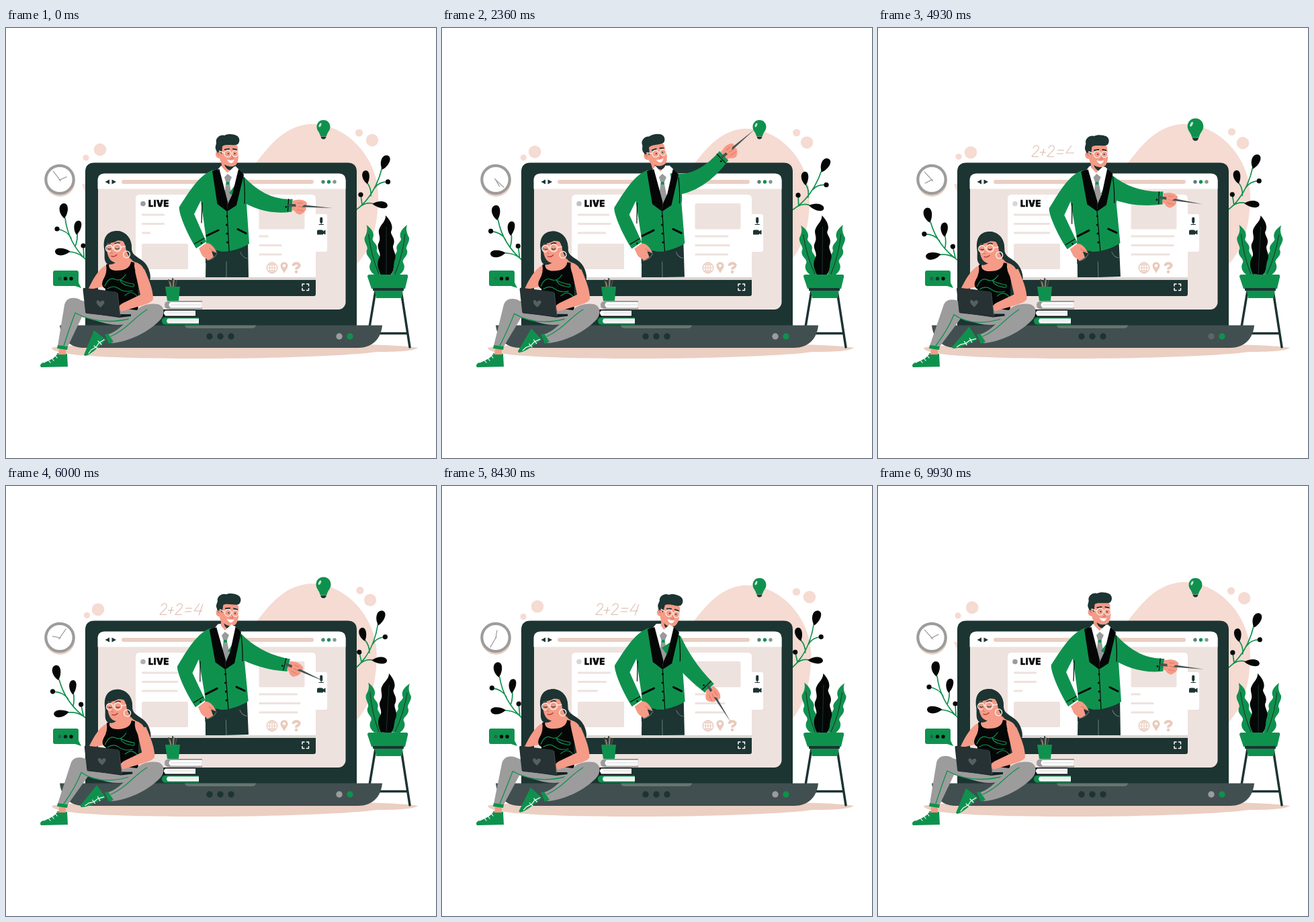
Write an HTML page that moves like this. It is 640 by 640 pixels and loops after 10000 ms.

```html
<!DOCTYPE html>
<html lang="en">
<head>
<meta charset="utf-8">
<title>Online lesson</title>
<style>
html, body { margin: 0; width: 100%; height: 100%; overflow: hidden; background: #fff; }
svg { display: block; width: 100vw; height: 100vh; }
.d { fill: #1c3432; } .g { fill: #0f914e; } .s { fill: #f59b87; } .b { fill: #ebcfc2; }
.p { fill: #f5dbd2; } .c { fill: #eee2de; } .w { fill: #fff; } .y { fill: #9c9c9c; } .k { fill: #050707; }
.l { fill: none; stroke-linecap: round; stroke-linejoin: round; }
.lg { stroke: #0f914e; } .lk { stroke: #050707; } .ld { stroke: #1c3432; } .lw { stroke: #fff; }
.ls { stroke: #d97766; } .lb { stroke: #e9cabb; }
text { font: 900 12.6px Inter, "Open Sans", sans-serif; letter-spacing: .6px; stroke: #050707; stroke-width: .5px; }
</style>
</head>
<body>
<svg viewBox="0 0 640 640">
<defs>
  <path id="leaf" d="M0 11.500C-9 3-8-11 1-11C9-10 7 4 0 11.500Z"/>
  <path id="frond" d="M537 293C545 299 550 306 546 314C546 319 555 322 552 331C552 336 560 340 557 349Q556 358 560 367H548C540 361 540 354 543 349C545 343 535 340 537 331C541 326 533 320 534 312C538 305 539 299 537 293Z"/>
  <path id="vein" class="l ld" d="M540 307Q544 340 555 366"/>
</defs>

<path id="blob" class="p" d="M113 232L250 250L372 201C394 172 416 146 452 143C508 141 554 195 554 250C554 300 541 333 518 356L300 400L140 300Z"/>
<g class="p">
  <g id="big"><circle cx="140" cy="181" r="9.300"/><circle cx="545" cy="167" r="9.200"/></g>
  <g id="small"><circle cx="119" cy="193" r="4.600"/><circle cx="525.500" cy="156" r="5.600"/></g>
</g>
<path class="b" d="M68 476C110 466 560 466 613 476C606 482 570 482 552 482C480 492 220 496 110 487C80 484 68 480 68 476Z"/>

<circle class="b" cx="80.500" cy="229" r="22"/>
<circle cx="80" cy="225.500" r="20.700" fill="#fff" stroke="#9c9c9c" stroke-width="4.200"/>
<g class="l" stroke="#a0a0a0" stroke-width="1.300">
  <path id="minute" d="M80 228V210"/><path id="hour" d="M80 227V215"/>
</g>

<g id="sprigL">
  <path class="l lg" stroke-width="1.700" d="M121 347C103 330 91 308 88 283M76 299Q92 302 97 313M106 304Q107 315 103 325M115 324L116 341M92 333Q106 333 115 341"/>
  <g class="k">
    <use href="#leaf" transform="translate(86 272) rotate(-4)"/>
    <use href="#leaf" transform="translate(106.500 297) rotate(8) scale(.85 .95)"/>
    <use href="#leaf" transform="translate(84 333) rotate(-92) scale(.85 1)"/>
    <circle cx="76" cy="299" r="3.600"/><circle cx="115" cy="324" r="3.600"/>
  </g>
</g>
<g id="sprigR">
  <path class="l lg" stroke-width="1.700" d="M518 273C540 258 553 236 560 207M538 231Q544 239 543 250M568 229Q555 229 549 238M528 248L530 263M548 262Q538 258 528 265"/>
  <g class="k">
    <use href="#leaf" transform="translate(564 200) rotate(20)"/>
    <use href="#leaf" transform="translate(536 222) rotate(-10) scale(.85 .9)"/>
    <use href="#leaf" transform="translate(557 263) rotate(96) scale(.8 1)"/>
    <circle cx="568.500" cy="229" r="3.600"/><circle cx="528" cy="248" r="3.600"/>
  </g>
</g>

<g id="bulb">
  <path class="g" d="M472.500 137C479 137 482.500 142 482.500 147C482.500 153 478 155 477 161H468C467 155 462.500 153 462.500 147C462.500 142 466 137 472.500 137Z"/>
  <path class="d" d="M468.500 161.500H476.500Q476 165.500 472.500 165.500Q469 165.500 468.500 161.500Z"/>
  <ellipse cx="467.500" cy="144.500" rx="1.500" ry="3.200" fill="#c9ecd3" transform="rotate(25 467.500 144.500)"/>
</g>
<path id="rays" class="l" stroke="#dd9a5c" stroke-width="2" d="M461 129L462 130.500M473 125.500V127.500M484 128.500L483 130"/>
<g id="sum" class="l" stroke="#dcbbad" stroke-width="1.100" style="stroke-linecap:butt"></g>

<g class="l ld" stroke-width="3.500">
  <path d="M550 391L541 445M588 391L601 475M555 454.500H597"/>
</g>
<g id="frondL"><use href="#frond" class="g"/><use href="#vein"/></g>
<g id="frondR"><g transform="matrix(-1 0 0 1 1134 0)"><use href="#frond" class="g"/><use href="#vein"/></g></g>
<g id="frondM">
  <path class="k" d="M565 279C573 287 577 296 573 303C572 308 580 313 577 322C573 328 582 335 579 344C576 350 579 360 573 367H558C552 356 552 348 556 341C559 334 550 327 555 319C559 311 552 305 556 298C559 291 565 288 565 279Z"/>
  <path class="l ld" d="M566 296V366"/>
</g>
<path class="g" d="M538 370Q538 367 541 367H596Q599 367 598 371L594 388H544ZM548 388H591L589 402H551Z"/>
<path class="d" d="M546 387H592V391H546Z"/>

<path class="d" d="M118 214Q118 200.500 132 200.500H508Q522 200.500 522 214V444H118Z"/>
<rect class="c" x="137" y="217" width="368.500" height="202" rx="11"/>
<path class="w" d="M136.500 239.500V227Q136.500 216.500 147 216.500H495Q505.500 216.500 505.500 227V239.500Z"/>
<path class="d" d="M154 225.500V232.500L147.500 229ZM157.500 225.500V232.500L164 229Z"/>
<rect class="b" x="172" y="226" width="286" height="6" rx="3"/>
<circle cx="472" cy="229" r="2.700" fill="#568078"/><circle class="g" cx="480.500" cy="229" r="2.700"/><circle cx="489" cy="229" r="2.700" fill="#82978f"/>
<path class="w" d="M193 376V254Q193 248 199 248H455Q461 248 461 254V376ZM461 277H475Q478 277 478 280V330Q478 333 475 333H461Z"/>
<circle id="live" cx="204" cy="261.500" r="3.800" fill="#9b9a9e"/>
<text class="k" x="212" y="266">LIVE</text>
<rect class="c" x="202" y="321" width="69" height="38" rx="2"/>
<rect class="c" x="376.500" y="261" width="68" height="38.500" rx="2"/>
<g id="lines" class="c"></g>
<g class="l lb" stroke-width="1.200">
  <circle cx="396" cy="357" r="7.800"/><ellipse cx="396" cy="357" rx="3.700" ry="7.800"/>
  <path d="M396 349V365M388 357H404M390 352.500H402M390 361.500H402"/>
</g>
<path fill="#e9cabb" fill-rule="evenodd" d="M414 365C411 359 408.500 357 408.500 354C408.500 346.500 419.500 346.500 419.500 354C419.500 357 417 359 414 365ZM414 351.500A2.300 2.300 0 1 0 414 356.100A2.300 2.300 0 1 0 414 351.500Z"/>
<path class="l lb" stroke-width="4" d="M427.500 354C427.500 349 437 349 436.500 354C436 357 432 356 432 359.500" style="stroke-linecap:butt"/>
<circle cx="432" cy="363" r="2.200" fill="#e9cabb"/>
<rect class="d" x="467.200" y="281.500" width="4" height="9" rx="2"/>
<path class="l ld" d="M469.200 290V292.500M466 292.500H472.500"/>
<path class="d" d="M463 302Q463 300.500 465 300.500H470Q472 300.500 472 302.500L475.500 300.500V307.500L472 306V307.500H463Z"/>

<path class="d" d="M193 375H461V396Q461 399 458 399H193Z"/>
<path class="l lw" stroke-width="1.500" d="M441 384V381H444M447.500 381H450.500V384M450.500 387.500V390.500H447.500M444 390.500H441V387.500"/>

<g id="teacher">
  <path class="d" d="M298 318L360 316L361 371H297Z"/>
  <path class="l" stroke="#6c7d7a" stroke-width="1" d="M328 348V371M349 334Q352 342 359 343"/>
  <path class="w" d="M315 211L321 205L341 205L347 211L345 240L330 270L316 238Z"/>
  <g id="head">
    <path class="s" d="M320 193H341L341 207L330 216L321 207Z"/>
    <path class="s" d="M316 176C317 167 344 167 345 178L346 191C346 201 341 208 334 208C326 208 320 203 318 194C311 194 310 184 316 182Z"/>
    <path class="d" d="M315 187L312 180C311 176 313 174 313 171C311 163 320 158 325 160C330 157 339 158 343 160C349 163 348 170 345 173C340 176 327 172 322 176L321 188Q317 181 315 187Z"/>
    <path class="d" d="M325 203Q333 209 342 204Q340 211 334 212Q327 210 325 203Z"/>
    <path class="l ld" stroke-width="2" d="M326 181L332 180M338 180L343 181"/>
    <path class="l ls" stroke-width="1.300" d="M335 187L338 194L334 194.500M314.500 185L317 189"/>
    <path class="w" d="M329 196Q335 198 340 196Q338 202 334 201Q331 200 329 196Z"/>
    <g fill="none" stroke="#f9e3dc" stroke-width="1.500"><circle cx="330" cy="187" r="5"/><circle cx="341" cy="187" r="4.500"/><path d="M325 186L317 183"/></g>
    <circle class="d" cx="331" cy="187" r="1"/><circle class="d" cx="340.500" cy="187" r="1"/>
  </g>
  <path class="w" d="M315 211L320 205L329 216L340 206L347 211L336 222L330 217L322 223Z"/>
  <path fill="#999a9c" d="M330 217L336 222L332.500 230L337 255L330 266L324 255L327.500 230L325 222Z"/>
  <path class="g" d="M328 229H332.500V233H327.500Z"/>
</g>
<path id="arm" class="g"/>
<path id="cuff" class="l lk" stroke-width="1.200"/>
<circle id="stud" class="k" r="1.300"/>
<g id="hand">
  <path class="s" d="M0-7L8-9Q16-10 21-6Q23-3 20 0L21 4Q20 9 13 13Q7 13 4 8L0 7Z"/>
  <path fill="#455354" d="M-6-1.800L8-2.200L60 0L8 1.800L-6 1.600Z"/>
  <path class="s" d="M5-4Q12-8 17-4Q19-1 15 0L16 5Q13 8 9 6Q5 4 5-4Z"/>
  <path class="l ls" d="M9 1L17 2M8 6L17 7M8-4L15-4"/>
</g>
<g id="jacket">
  <path class="g" d="M309 211C290 217 276 238 258 266C256 270 264 297 283 328L298 318L280 277L290 257L297 307L299 331Q326 334 333 332Q352 328 362 321L358 262C361 245 356 218 347 211L344 250L329 273L314 250Z"/>
  <path class="k" d="M307 213L317.500 210L330 259L329 273L314.500 262ZM346 210L354 218L343 264L329 273L330 262L337 247Z"/>
  <g class="l lk">
    <path stroke-width="1.200" d="M329 273L332 332M292 260L291 290M354 223Q356 245 355 261M281 321L295 313"/>
    <path stroke-width="3" d="M299 309L316 301M345 299.500L357 305.500"/>
  </g>
  <g class="k"><circle cx="329" cy="280" r="1.500"/><circle cx="328.500" cy="293" r="1.500"/><circle cx="329" cy="306" r="1.500"/><circle cx="329.500" cy="319" r="1.500"/><circle cx="291" cy="320" r="1.300"/></g>
  <path class="d" d="M297 336L313 331L319 332V350H297Z"/>
  <path class="s" d="M287 328L298 320C305 320 310 326 314 335L306 332L309 341L301 346C297 342 293 341 291 337Z"/>
  <path class="l ls" d="M303 328L312 334"/>
  <path class="l" stroke="#6c7d7a" d="M299 346Q309 345 314 336"/>
</g>
<path fill="#ddd5d1" d="M193 371H461V375H193Z"/>

<path fill="#414f50" d="M80 442.500H560C558 464 544 476 524 476H115C95 476 82 462 80 442.500Z"/>
<path fill="#64766f" d="M266 442.500H372Q371 447 366 447H272Q267 447 266 442.500Z"/>
<g class="d"><circle cx="303" cy="459" r="4.700"/><circle cx="319" cy="459" r="4.700"/><circle cx="335" cy="459" r="4.700"/></g>
<circle id="lamp" class="y" cx="496" cy="459" r="4.700"/><circle class="g" cx="512" cy="459" r="4.700"/>

<path class="l" stroke="#434d4b" stroke-width="2" d="M242 375L245 388M248 373V388M254 376L251 388"/>
<path class="l" stroke="#b58a6a" stroke-width="1.500" d="M244 378L246 387M250 374L249 387"/>
<path class="g" d="M237 385H259L257 406H240Z"/>
<g id="books">
  <path class="y" d="M292 406H243Q236 407 236 412Q236 418 243 418.500H292V416H244V408H292Z"/><path class="w" d="M291 408H245Q240 412 245 416.500H291Z"/>
  <path class="k" d="M282 419H234V429.500H282Z"/><path class="w" d="M282 420.500H237Q233 424 237 428.500H282Z"/>
  <path class="g" d="M287 431H238Q232 431 232 436Q232 441.500 238 441.500H287Z"/><path class="w" d="M287 432.500H241Q237 436 241 439.500H287Z"/>
  <path class="l" stroke="#d5d5d5" d="M246 412H290M240 424H280M243 436H285"/>
</g>

<path class="g" d="M73 361H105Q108 361 108 364V379L112 387L103 384H73Q70 384 70 381V364Q70 361 73 361Z"/>
<circle id="dot1" cx="80" cy="373" r="2.700" fill="#2f4c5e"/><circle id="dot2" class="k" cx="88.500" cy="373" r="2.700"/><circle class="k" cx="97" cy="373" r="2.700"/>

<g id="girl">
  <path class="d" d="M146 328C144 310 152 302 165 302C179 303 187 314 187 328C187 342 204 341 211 356C216 366 216 376 212 378C204 378 198 372 194 364L152 352C144 347 148 338 146 328Z"/>
  <path class="s" d="M168 338L183 334C184 344 188 347 194 349C200 351 204 355 206 361L196 380L148 384L122 390C130 372 141 354 152 352Q166 353 168 338Z"/>
  <path class="k" d="M153 351Q152 360 162 361Q184 362 186 348L191 349Q190 362 198 371C195 390 198 405 196 427L146 428L148 388Q140 384 145 374Q151 364 149 352Z"/>
  <path class="l lg" stroke-width="1.200" d="M147 384Q153 370 162 374T178 367M170 375Q180 380 190 381Q193 387 183 384Q172 382 170 375M151 388Q160 382 168 388T188 391M177 398Q187 389 195 399M180 412Q188 401 194 406"/>
  <path class="s" d="M150 320C160 316 172 314 181 321L182 338C178 346 170 350 162 349C153 347 149 336 150 320Z"/>
  <path class="d" d="M148 329C144 316 153 302 166 302C180 303 188 315 187 329L185 344L179 332C178 322 175 316 169 313C165 319 156 320 150 321Z"/>
  <path class="l ld" stroke-width="1.600" d="M150 322.500L155 321M162 321Q165.500 318.500 169 320"/>
  <g fill="none" stroke="#fbe6df" stroke-width="1.600"><circle cx="153.500" cy="328" r="5"/><circle cx="165.500" cy="327" r="5.500"/><path d="M171 326L178 325"/></g>
  <path class="l ld" stroke-width="1.200" d="M152 328.500Q154 330 156 328.500M163 328Q165.500 330 168 328"/>
  <path class="l" stroke="#b83f3d" stroke-width="1.500" d="M157 339.500Q161 341.500 165 337.500"/>
  <path class="l ls" d="M158 329L156 335L159 335.500"/>
  <circle cx="179.500" cy="337" r="5" fill="none" stroke="#f8e9e3" stroke-width="1.500"/>
</g>

<path id="leg" class="y"/>
<path id="seam" class="l lg" stroke-width="1.300"/>
<path class="y" d="M194 421C199 413 214 409 226 411C237 414 237 427 229 435C212 453 180 468 157 469L149 457C169 451 177 438 194 421Z"/>
<path class="l lg" stroke-width="1.200" d="M156 459C180 448 189 432 210 419"/>
<g id="shoe">
  <path class="g" d="M131 450L149 464L142 471C134 478 126 486 118 488Q115 487 117 484Z"/>
  <path class="l lw" stroke-width="1.200" d="M146 464L138 469L134 475L127 479L123 484M137 466L142 471M131 473L136 477"/>
</g>
<path class="g" d="M147 456L152 455L160 467L153 470Z"/>
<path class="g" d="M76 484L91 485L92 504L52 505Q49 501 55 498Q70 494 76 484Z"/>
<path class="l lw" stroke-width="1.200" d="M76 485L70 491L62 495L56 498M67 490L71 495M62 493L66 498M72 486L76 491"/>
<path class="s" d="M79 478H89V486H78Z"/>
<path class="g" d="M77 472L92 474L91 479L76 477Z"/>

<g id="laptop">
  <path fill="#151f20" d="M119 424L168 426L186 426V429L169 431Z"/>
  <path class="s" d="M192 362L206 359C212 373 219 389 219 403C218 410 201 413 172 422L167 417Q169 411 177 408L200 397Z"/>
  <path fill="#263233" d="M114.500 389Q114.500 386 118 387L163 392.500Q166 393 166 395L170 430L121 425Q118 425 118 422Z"/>
  <path class="l" stroke="#435051" stroke-width="1" d="M166 395L170 429"/>
  <path fill="#566061" d="M141 416C132 410 134 404 138 405.500L140 408C143 404 148 406 146 410Z"/>
</g>
</svg>

<script>
const $ = id => document.getElementById(id);
const set = (id, name, value) => $(id).setAttribute(name, value);
const move = (id, value) => set(id, "transform", value);
const LOOP = 10, KEYS = [0, 1.21, 3.5, 4.93, 7, 8.43], N = KEYS.length;

// smooth cyclic curve through one value per key time
const track = vals => {
  const at = i => KEYS[(i + N) % N] + LOOP * Math.floor(i / N);
  const v = i => vals[(i + N) % N];
  const slope = i => (v(i + 1) - v(i - 1)) / (at(i + 1) - at(i - 1));
  return t => {
    let i = N - 1;
    while (KEYS[i] > t) i--;
    const d = at(i + 1) - at(i), u = (t - at(i)) / d, u2 = u * u, u3 = u2 * u;
    return (2 * u3 - 3 * u2 + 1) * v(i) + (u3 - 2 * u2 + u) * d * slope(i)
      + (3 * u2 - 2 * u3) * v(i + 1) + (u3 - u2) * d * slope(i + 1);
  };
};
const wave = (t, peak = 0, period = LOOP) => Math.cos((t - peak) * 2 * Math.PI / period);
const ramp = (t, a, b) => {
  const u = Math.min(1, Math.max(0, (t - a) / (b - a)));
  return u * u * (3 - 2 * u);
};

const tracks = list => list.map(track);
const big = tracks([[0, -3, -.5, -2, -3, 2], [0, 3, 3.3, 4.2, 1, -1.7]]);
const small = tracks([[0, 1, 3, 1, 2, 2], [0, 0, -.5, -1.5, .5, 1.5]]);
const head = tracks([[0, -6, -5, 1, 5, 6], [0, 0, 0, 1, 2, 2], [0, -10, -7, 2, 9, 10]]);
const elbow = tracks([[383, 382, 382, 378, 374, 366], [261, 234, 226, 251, 259, 268]]);
const wrist = tracks([[426, 426, 415, 424, 414, 398], [264, 207, 192, 253, 275, 301]]);
const aim = track([4, -28, -40, 8.8, 35, 57.7]);
const dot1 = track([.65, .65, 0, .7, .6, .65]);
const dot2 = track([1, 1, .9, .6, 1, 1]);

const svg = (tag, parent, attrs) => {
  const el = document.createElementNS("http://www.w3.org/2000/svg", tag);
  for (const k in attrs) el.setAttribute(k, attrs[k]);
  return $(parent).appendChild(el);
};
const lines = [
  [202, 278, [34, 39, 54, 54, 54, 49]],
  [202, 291.5, [34, 44, 54, 54, 54, 43]],
  [202, 305, [13, 27, 54, 54, 50, 30]],
  [376.5, 310, [14, 29, 67, 65, 48, 32]],
  [376.5, 323.5, [34, 41, 62, 64, 58, 45]],
  [376.5, 337, [34, 40, 58, 58, 58, 45]]
].map(([x, y, w]) => ({
  el: svg("rect", "lines", { x, y: y - 1.6, height: 3.2, rx: 1.2 }),
  width: track(w), max: Math.max(...w)
}));

const two = x => `M${x + 2} 179C${x + 4} 173 ${x + 12} 174 ${x + 10} 180C${x + 8} 185 ${x + 2} 187 ${x} 191.500H${x + 10}`;
const strokes = [two(229), "M241 185H250", "M247 180L244.500 190", two(252),
  "M267 182H277", "M266 187H276", "M288 175L280 186H292", "M293 176L287 192.500"
].map(d => svg("path", "sum", { d, pathLength: 1, "stroke-dasharray": "1 2" }));

const norm = (a, b) => {
  const dx = b[0] - a[0], dy = b[1] - a[1], l = Math.hypot(dx, dy);
  return [dy / l, -dx / l];
};
const off = (p, n, w) => [p[0] + n[0] * w, p[1] + n[1] * w];

function drawArm(t, lean) {
  const s = [343 - 3 * lean, 231], e = elbow.map(f => f(t)), w = wrist.map(f => f(t));
  const n1 = norm(s, e), n2 = norm(e, w), ne = norm(s, w);
  const bend = e.map((v, i) => v + (v - (s[i] + w[i]) / 2) * .5);
  const P = (p, n, k) => off(p, n, k).map(v => v.toFixed(2)).join(" ");
  set("arm", "d", `M${P(s, n1, 15)}Q${P(bend, ne, 11)} ${P(w, n2, 9.5)}L${P(w, n2, -9.5)}Q${P(bend, ne, -14)} ${P(s, n1, -18)}Z`);
  const back = off(w, [n2[1], -n2[0]], 6);
  set("cuff", "d", `M${P(back, n2, 9)}L${P(back, n2, -9)}`);
  set("stud", "cx", back[0] + n2[1] * 3 - n2[0] * 3);
  set("stud", "cy", back[1] - n2[0] * 3 - n2[1] * 3);
  move("hand", `translate(${w}) rotate(${aim(t)})`);
}

function drawLeg(q) {
  const x = 97 + 10 * q, y = 402 + 2.5 * q;
  set("leg", "d", `M77 473L${x - 10} ${y + 10}C${x - 7} ${y - 2} ${x + 6} ${y - 2} ${x + 14} ${y + 3}L135 413L195 420L203 428Q182 447 150 440L${x + 16} ${y + 28}L92 474Z`);
  set("seam", "d", `M86 473Q${x - 2} ${y + 43} ${x + 6} ${y + 22}Q140 ${y + 42} 187 432`);
}

function draw(t) {
  const q = (1 - wave(t)) / 2;
  const pulse = wave(t, 0, 5);
  move("blob", `translate(400 300) scale(${.978 + .022 * pulse}) translate(-400 -300)`);
  move("big", `translate(${big.map(f => f(t))})`);
  move("small", `translate(${small.map(f => f(t))})`);
  move("minute", `rotate(${323 + 72 * t} 80 226)`);
  move("hour", `rotate(${66 + 36 * t} 80 226)`);

  move("sprigL", `rotate(${-9 * q} 121 348)`);
  move("sprigR", `rotate(${6 * wave(t, 2.25) - 1} 519 272)`);
  move("frondL", `rotate(${2.3 * wave(t, 7.2)} 553 367)`);
  move("frondR", `rotate(${1.3 + 1.8 * wave(t, 6.2)} 581 367)`);
  move("frondM", `rotate(${1.5 + 1.8 * wave(t, 6)} 566 367)`);

  const grow = 1 + .18 * (ramp(t, 2.3, 4.2) - ramp(t, 5.5, 6.6));
  move("bulb", `translate(472.5 151.5) scale(${grow}) translate(-472.5 -151.5)`);
  set("rays", "opacity", ramp(t, 2.8, 3.2) - ramp(t, 3.7, 4.1));
  move("rays", `translate(0 ${2 - 2 * ramp(t, 2.8, 3.5)})`);

  strokes.forEach((el, i) => {
    const u = Math.min(1, Math.max(0, (t - 3.1) / .26 - i));
    el.setAttribute("stroke-dashoffset", 1.01 - 1.01 * u);
  });
  set("sum", "opacity", 1 - ramp(t, 9.2, 9.7));
  lines.forEach(l => l.el.setAttribute("width", Math.min(l.max, l.width(t))));
  set("live", "opacity", .7 + .3 * wave(t, 0, LOOP / 3));
  set("lamp", "opacity", 1 - .7 * (ramp(t, 4.4, 4.9) - ramp(t, 5, 5.5)));
  set("dot1", "opacity", Math.max(0, dot1(t)));
  set("dot2", "opacity", Math.min(1, dot2(t)));

  const lean = `rotate(${-1.7 * q} 328 371)`;
  move("teacher", lean);
  move("jacket", lean);
  const [hx, hy, ha] = head.map(f => f(t));
  move("head", `translate(${hx} ${hy}) rotate(${ha} 329 205)`);
  drawArm(t, q);

  move("girl", `translate(0 ${q}) rotate(${.7 * q} 170 428)`);
  move("laptop", `translate(${2.5 * q} ${-.5 * q})`);
  move("shoe", `rotate(${18 * q} 150 462)`);
  drawLeg(q);
}

function frame() {
  draw(performance.now() / 1000 % LOOP);
  requestAnimationFrame(frame);
}
frame();
</script>
</body>
</html>
```
